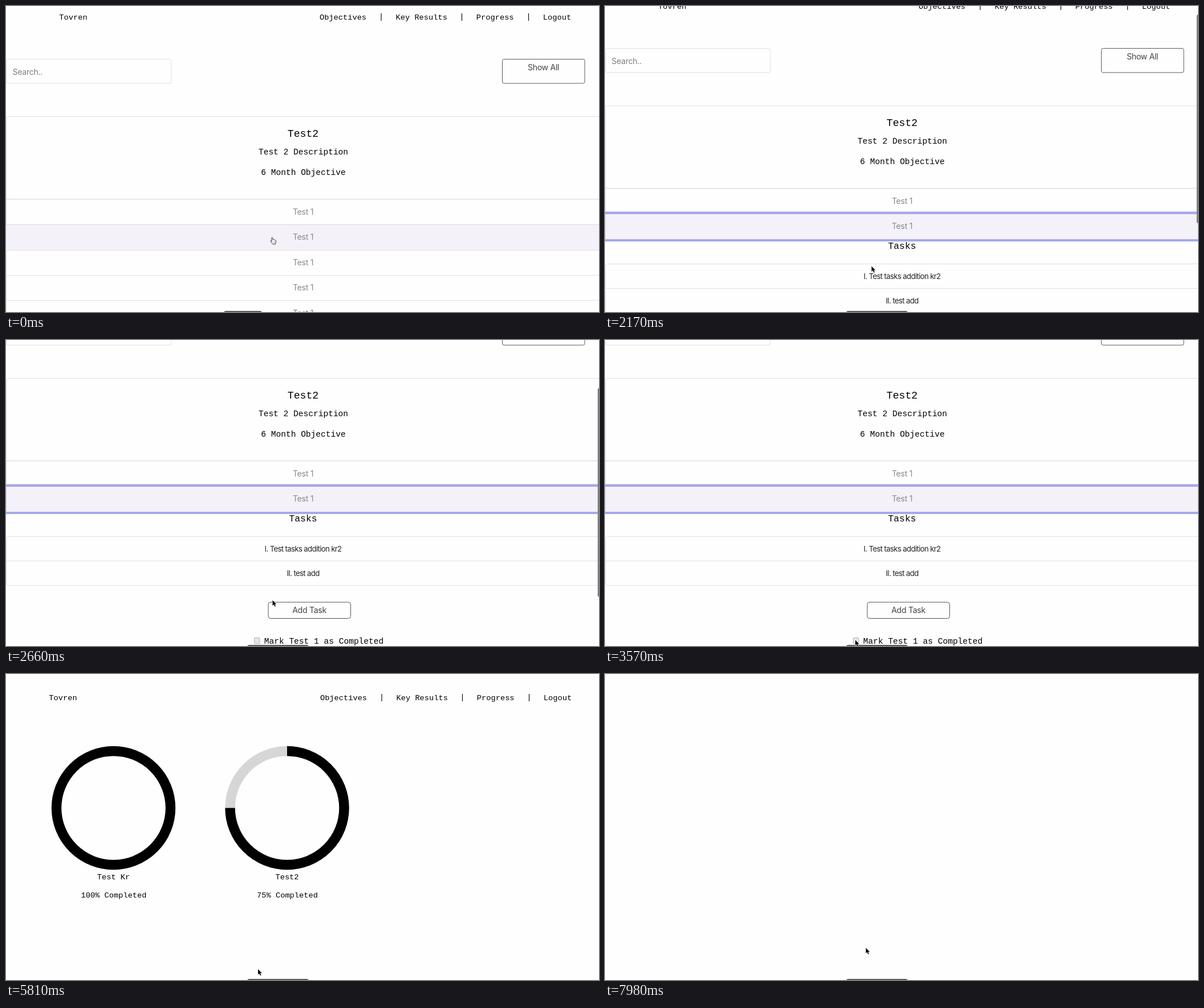
These frames come from a looping animation (1040x538 px, 8000 ms). An HTML page with a canvas:

```html
<!DOCTYPE html>
<html lang="en">
<head>
<meta charset="utf-8">
<title>Objectives</title>
<style>
html, body { margin: 0; width: 100%; height: 100%; overflow: hidden; background: #fefefe; }
canvas { display: block; width: 1040px; height: 538px; }
</style>
</head>
<body>
<canvas id="stage" width="1040" height="538"></canvas>
<script>
const ctx = document.getElementById('stage').getContext('2d');
const W = 1040, H = 538, LOOP = 8000, STEP = 70;
const BG = '#fefefe', LINE = '#e0e0e0', BRAND = 'Tovren';
const MONO = '"Liberation Mono", "Courier New", monospace';
const SANS = 'Inter, Roboto, sans-serif';

// [time, value...] keys, linear in between
function track(keys, t) {
  if (t <= keys[0][0]) return keys[0].slice(1);
  for (let i = 1; i < keys.length; i++) {
    const a = keys[i - 1], b = keys[i];
    if (t <= b[0]) {
      const k = (t - a[0]) / (b[0] - a[0]);
      return a.slice(1).map((v, j) => v + (b[j + 1] - v) * k);
    }
  }
  return keys[keys.length - 1].slice(1);
}

const SCROLL = [[2030, 0], [2100, 5], [2170, 19], [2310, 63], [2450, 104],
  [2520, 116], [2590, 123], [2660, 127]];

const POINTER = [[1680, 467, 407], [1750, 467, 417], [1820, 467.3, 443], [1890, 467.5, 457.5],
  [2940, 467.5, 457.5], [3080, 463, 467], [3290, 449, 502], [3430, 441, 521], [3570, 439, 527.5],
  [5530, 439, 527.5], [5600, 439, 527], [5670, 439, 527], [5810, 442, 519], [5950, 445, 509.5],
  [7280, 445, 509.5], [7420, 450, 498], [7560, 457.5, 481.5]];

function text(s, x, y, size, family, color, align = 'center', spacing = 0) {
  ctx.font = `${size}px ${family}`;
  ctx.letterSpacing = spacing + 'px';
  ctx.textAlign = align;
  ctx.fillStyle = color;
  ctx.fillText(s, x, y);
}

const mono = (s, x, y, size = 13.7) => text(s, x, y, size, MONO, '#000');
const label = (s, x, y, color, align) => text(s, x, y, 14.1, SANS, color, align, -0.3);

function rect(x, y, w, h, color) {
  ctx.fillStyle = color;
  ctx.fillRect(x, y, w, h);
}

function box(x, y, w, h, r, stroke, fill, lw = 1) {
  ctx.beginPath();
  ctx.roundRect(x, y, w, h, r);
  if (fill) { ctx.fillStyle = fill; ctx.fill(); }
  ctx.lineWidth = lw;
  ctx.strokeStyle = stroke;
  ctx.stroke();
}

function nav(brandX, dx, y) {
  mono(BRAND, brandX, y);
  mono('Objectives', 591 + dx, y);
  mono('Key Results', 728.7 + dx, y);
  mono('Progress', 857.7 + dx, y);
  mono('Logout', 966.5 + dx, y);
  for (const x of [658, 799.5, 916.5]) rect(x + dx - 0.6, y - 11, 1.2, 13, '#111');
}

function focusRow(t) {
  const alpha = track([[1260, 0.2], [1330, 0.5], [1470, 1]], t)[0];
  ctx.globalAlpha = alpha;
  rect(0, 380.5, W, 4.5, '#a5a9ea');
  rect(0, 428.5, W, 4.5, '#a5a9ea');
  ctx.globalAlpha = 1;
  rect(0, 385, W, 44, '#f4f1f9');
  rect(0, 385, 1, 44, '#d8d4e0');
}

function tasks() {
  mono('Tasks', 521, 446, 16.3);
  box(0.5, 472.5, W + 10, 86, 4, LINE);
  rect(0, 515, W, 1, LINE);
  text('I. Test tasks addition kr2', 521, 499, 13.2, SANS, '#212529', 'center', -0.65);
  text('II. test add', 521, 542, 13.2, SANS, '#212529', 'center', -0.65);
  box(460, 588, 144.5, 28.5, 4, '#555');
  label('Add Task', 532, 607, '#444');
  box(435.5, 650.5, 9.5, 10.5, 1.5, '#b0b0b0', '#e6e6e6');
  text('Mark Test 1 as Completed', 557.5, 661, 14.55, MONO, '#000');
}

function listPage(t) {
  const y = track(SCROLL, t)[0], open = t >= 1330;
  ctx.save();
  ctx.translate(0, -y);
  nav(118, 0, 24);

  box(0.5, 93.5, 289.5, 42.5, 3, LINE);
  label('Search..', 11.5, 120.5, '#7b7f83', 'left');
  box(870.5, 93.5, 144.5, 42.5, 3, '#5a5a5a');
  label('Show All', 942.5, 112.5, '#444');

  box(0.5, 194.5, W + 10, 145, 4, LINE);
  mono('Test2', 521, 230, 18.2);
  mono('Test 2 Description', 521.5, 261, 14.55);
  mono('6 Month Objective', 521.5, 297, 14.55);

  rect(0, 339, W, 1, '#d4d4d4');
  rect(0, 340, 1, open ? 41 : 200, LINE);
  if (open) {
    focusRow(t);
    tasks();
  } else {
    rect(0, 384, W, 45, '#f4f1f9');
    rect(0, 384, W, 1, '#dcd8e3');
    for (const ly of [429, 473, 517]) rect(0, ly, W, 1, LINE);
  }
  const rows = open ? 2 : 5;
  for (let i = 0; i < rows; i++) label('Test 1', 521, Math.round(367 + i * 44.4), '#8a8a8a');
  ctx.restore();

  if (t >= 2100) {
    ctx.globalAlpha = track([[2940, 1], [3290, 0]], t)[0];
    ctx.beginPath();
    ctx.roundRect(1037.7, 2.7 + y * 0.647, 5, 367, 2.5);
    ctx.fillStyle = '#7d7d7d';
    ctx.fill();
    ctx.globalAlpha = 1;
  }
}

function ring(x, share, name) {
  const top = -Math.PI / 2;
  const arc = (part, color) => {
    ctx.beginPath();
    ctx.arc(x, 235.5, 100, top, top + part * 2 * Math.PI);
    ctx.lineWidth = 17.4;
    ctx.strokeStyle = color;
    ctx.stroke();
  };
  if (share < 1) arc(1, '#d6d6d6');
  arc(share, '#000');
  mono(name, x, 361);
  mono(share * 100 + '% Completed', x + 0.5, 392.5);
}

function progressPage() {
  nav(100, 1, 46);
  ring(188.5, 1, 'Test Kr');
  ring(493, 0.75, 'Test2');
}

function statusTip(t) {
  const [x, w] = t < 70 ? [382.5, 66] : [423.5, 107];
  box(x, 537, w, 12, 3, '#3c3c3c', '#999', 1.3);
}

const ARROW = new Path2D('M0 0V9.6L2.2 7.6L3.8 11.2L5.4 10.5L3.8 7H6.8Z');
const HAND = new Path2D('M2.3 1.5Q3.3 .2 4.3 1.5L4.6 4.6Q5.6 4 6.3 4.9Q7.3 4.3 8 5.2' +
  'Q9.2 4.8 9.8 6Q10.4 8.5 9.2 11L9 12.4H4Q2.6 10.2 .7 8Q.3 6.7 1.5 6.6L2.6 7.6Z');

function pointer(t) {
  const [x, y] = track(POINTER, t);
  ctx.save();
  ctx.lineJoin = 'round';
  if (y < 430 && t < 1890) {
    ctx.translate(x - 3.5, y - 0.8);
    ctx.fillStyle = '#fff';
    ctx.strokeStyle = '#222';
    ctx.lineWidth = 0.9;
    ctx.fill(HAND);
    ctx.stroke(HAND);
    for (const fx of [5, 6.7, 8.3]) rect(fx, 7.8, 0.5, 2.6, '#555');
  } else {
    ctx.translate(x, y);
    ctx.strokeStyle = '#fff';
    ctx.lineWidth = 1.3;
    ctx.stroke(ARROW);
    ctx.fillStyle = '#000';
    ctx.fill(ARROW);
  }
  ctx.restore();
}

function draw() {
  const now = performance.now() % LOOP;
  const t = Math.floor((now + 0.01) / STEP) * STEP;
  rect(0, 0, W, H, BG);
  const loading = t < 4410 || (t >= 6720 && t < 6790) || t >= 7910;
  if (t < 4130) listPage(t);
  else if (!loading) progressPage();
  statusTip(t);
  pointer(t);
  requestAnimationFrame(draw);
}
draw();
</script>
</body>
</html>
```
